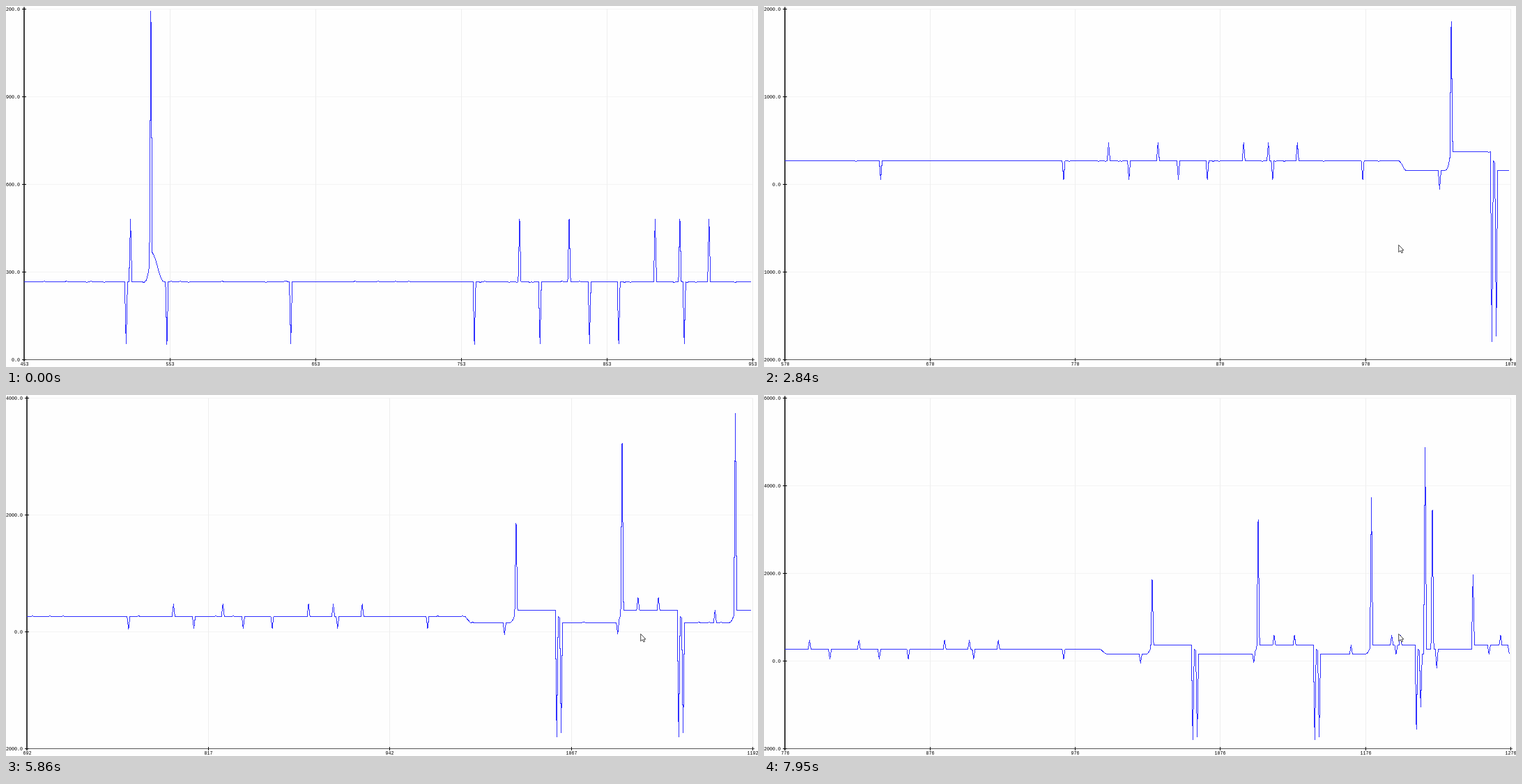
An HTML page for the animation above (8000 ms loop, 1079 px wide and 519 px high).

```html
<!DOCTYPE html>
<html lang="en">
<head>
<meta charset="utf-8">
<title>Scrolling signal chart</title>
<style>
  html, body { margin: 0; width: 100%; height: 100%; overflow: hidden; background: #fefefe; }
  svg { display: block; width: 1079px; height: 519px; }
  path { fill: none; }
  text { font: 6.67px "Liberation Mono", "DejaVu Sans Mono", monospace; fill: #000; }
</style>
</head>
<body>
<svg viewBox="0 0 1079 519">
  <path id="rows" stroke="#f4f4f4"/>
  <path id="columns" stroke="#eee"/>
  <path id="axisX" stroke="#555"/>
  <path id="ticks" stroke="#111"/>
  <path id="axisY" stroke="#000" stroke-width="1.5"/>
  <g id="labels"></g>
  <path id="signal" stroke="#3030ff" stroke-linejoin="bevel" shape-rendering="crispEdges"/>
  <path id="cursor" d="M0 0V10.4L2.4 8.2L4.2 11.6L5.8 10.8L4.2 7.6H7.2Z" style="fill:#fff" stroke="#333" stroke-width=".9"/>
</svg>
<script>
const $ = id => document.getElementById(id);
const LOOP = 8000, REDRAW = 115.5, LEAD = 50;
const SPAN = 500, TOP = 4.5, BOTTOM = 508.5, RIGHT = 1071.5;
const REST = 267, LOW = 160, HIGH = 370, BLIP = 213;

const samples = Array(1300);
const random = i => Math.abs(Math.sin(i * 12.9898) * 43758.5453) % 1;

// Hold a level from one sample onwards, with a rare small wobble
function hold(from, level) {
  for (let i = from; i < samples.length; i++) {
    const r = random(i);
    samples[i] = level + (r < 0.04 ? 2 : r > 0.97 ? -2 : 0);
  }
}

function ramp(from, count, a, b, ease) {
  for (let k = 0; k < count; k++) samples[from + k] = a + (b - a) * ease((k + 1) / count);
}
const speedUp = p => p * p;
const smooth = p => (1 - Math.cos(Math.PI * p)) / 2;

function rise(at, peak) {
  ramp(at - 3, 3, LOW, 290, speedUp);
  hold(at, HIGH);
  samples[at] = peak;
}

function drop(at, first, second) {
  hold(at, LOW);
  samples[at] = first;
  samples[at + 1] = REST;
  samples[at + 2] = 235;
  samples[at + 3] = second;
}

function buildSignal() {
  hold(0, REST);
  ramp(537, 3, REST, 325, speedUp);
  samples[540] = 1193;
  ramp(541, 9, 370, REST, smooth);

  hold(994, LOW);
  ramp(994, 5, REST, LOW, smooth);
  rise(1029, 1857);
  drop(1057, -1797, -1731);
  rise(1102, 3226);
  drop(1141, -1797, -1731);
  rise(1180, 3736);
  drop(1211, -1548, -1048);
  hold(1217, REST);
  samples[1217] = 4875;
  samples[1222] = 3446;
  hold(1250, HIGH);
  samples[1250] = 1968;

  // Short blips of one size; a repeated place doubles it
  for (const i of [526, 793, 827, 886, 903, 923, 1113, 1127, 1166, 1194, 1200, 1269]) samples[i] += BLIP;
  for (const i of [523, 551, 636, 762, 807, 841, 861, 906, 968, 1021, 1099, 1197, 1225, 1225, 1261, 1275]) samples[i] -= BLIP;
}

// First visible sample at some redraws; the scroll is linear between them
const scroll = [[0, 453], [9, 494], [25, 570], [60, 735], [69, 776]];

function firstSample(redraw) {
  const k = Math.max(1, scroll.findIndex(p => p[0] >= redraw));
  const [r0, s0] = scroll[k - 1], [r1, s1] = scroll[k];
  return s0 + Math.floor((s1 - s0) * (redraw - r0) / (r1 - r0));
}

// Step is a quarter of the spread, rounded up to one significant digit
function niceRange(values) {
  const min = Math.min(...values), max = Math.max(...values);
  const quarter = (max - min) / 4, unit = 10 ** Math.floor(Math.log10(quarter));
  const step = Math.ceil(quarter / unit) * unit;
  return { step, low: Math.floor(min / step) * step, high: Math.ceil(max / step) * step };
}

const snap = v => Math.floor(v) + 0.5;
const label = (x, y, anchor, text) => `<text x="${x}" y="${y}" text-anchor="${anchor}">${text}</text>`;

function drawChart(start) {
  const view = samples.slice(start, start + SPAN);
  const { step, low, high } = niceRange(view);
  const rowCount = Math.round((high - low) / step), columnCount = rowCount + 1;
  const names = Array.from({ length: rowCount + 1 }, (_, k) => (low + k * step).toFixed(1));
  const left = 2 + 4 * Math.max(...names.map(n => n.length));
  const toX = i => left + (RIGHT - left) * i / SPAN;
  const toY = v => BOTTOM - (BOTTOM - TOP) * (v - low) / (high - low);

  let rows = '', columns = '', ticks = '', texts = '';
  names.forEach((name, k) => {
    const y = snap(toY(low + k * step));
    rows += `M${left} ${y}H${RIGHT}`;
    ticks += `M${left - 3} ${y}H${left + 3}`;
    texts += label(left - 6, y + 2.3, 'end', name);
  });
  for (let k = 0; k <= columnCount; k++) {
    const offset = SPAN * k / columnCount, x = snap(toX(offset));
    columns += `M${x} ${TOP}V${BOTTOM}`;
    if (k) ticks += `M${x} 506V511`;
    texts += label(x, 516.8, 'middle', Math.round(start + offset));
  }
  const paths = {
    rows, columns, ticks,
    axisX: `M${left - 3} ${BOTTOM}H1074`,
    axisY: `M${left} 1.5V511`,
    signal: 'M' + view.map((v, i) => toX(i).toFixed(2) + ' ' + snap(toY(v))).join('L')
  };
  for (const id in paths) $(id).setAttribute('d', paths[id]);
  $('labels').innerHTML = texts;
}

function drawCursor(redraw) {
  const p = Math.min(1, Math.max(0, (redraw - 4) / 4));
  const y = 519 - 175.5 * (1 - (1 - p) ** 2);
  $('cursor').setAttribute('transform', `translate(910.7 ${y})`);
  $('cursor').setAttribute('visibility', p > 0 ? 'visible' : 'hidden');
}

let shown = -1;
function frame() {
  const redraw = Math.floor((performance.now() % LOOP + LEAD) / REDRAW);
  if (redraw !== shown) {
    drawChart(firstSample(redraw));
    drawCursor(redraw);
    shown = redraw;
  }
  requestAnimationFrame(frame);
}
buildSignal();
frame();
</script>
</body>
</html>
```
